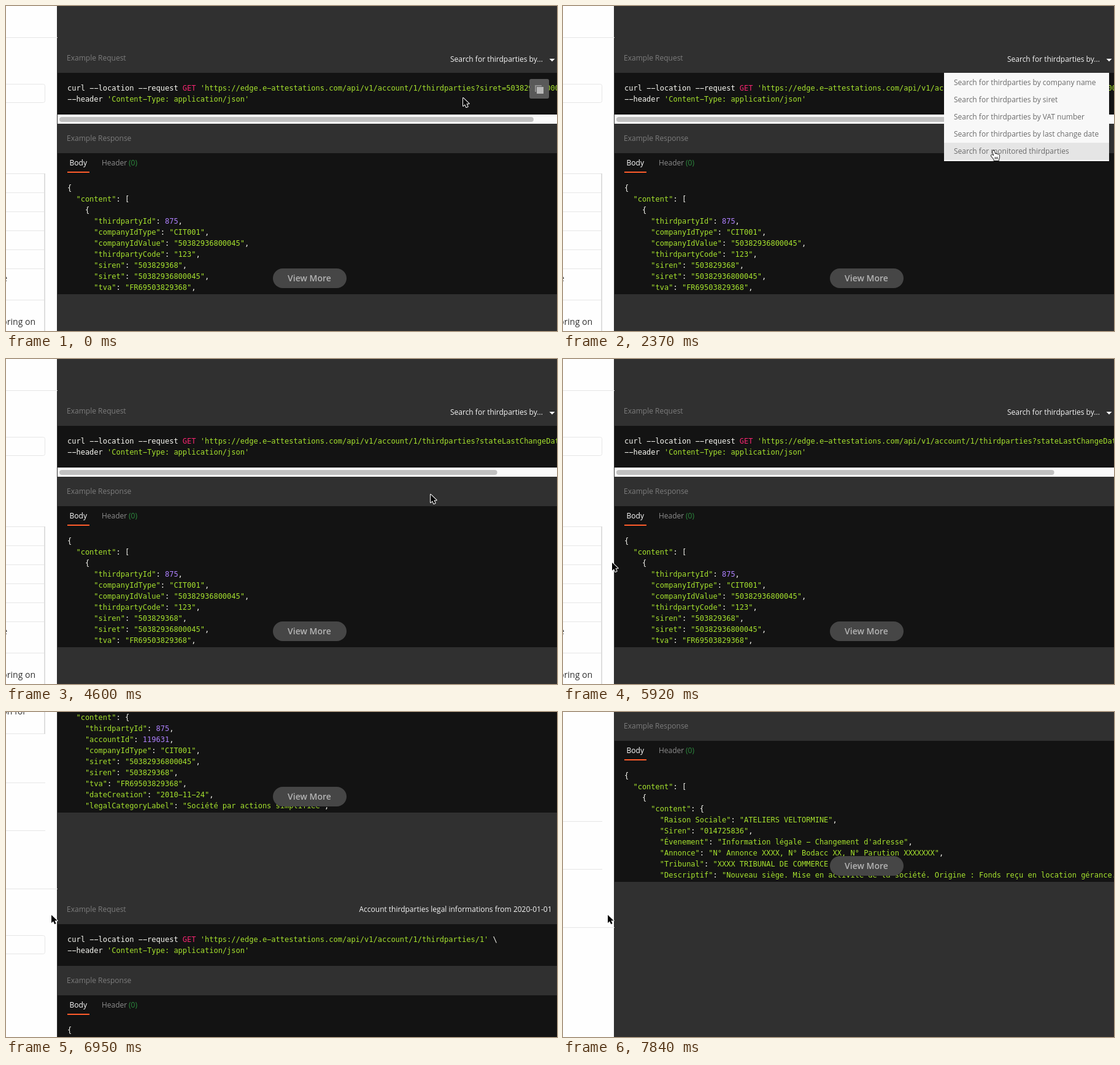
An HTML page with a canvas that plays this animation: 898 px wide and 530 px high, repeating every 7990 ms.

```html
<!DOCTYPE html>
<html lang="en">
<head>
<meta charset="utf-8">
<title>API documentation walkthrough</title>
<style>
  html, body { margin: 0; width: 100%; height: 100%; overflow: hidden; background: #303030; }
  canvas { display: block; }
</style>
</head>
<body>
<canvas id="stage" width="898" height="530"></canvas>
<script>
const ctx = document.getElementById('stage').getContext('2d');
const W = 898, H = 530;
const LOOP = 7990, TICK = LOOP / 54;
const UI = '"Open Sans", sans-serif';
const MONO = '12px "DejaVu Sans Mono", monospace';
const COLOR = {
  panel: '#303030', code: '#131313', line: '#e6e6e6', dim: '#7c7c7c', label: '#f4f4f4',
  plain: '#f8f8f2', string: '#a6e22e', number: '#ae81ff', verb: '#f92672'
};

const API = 'https://edge.e-attestations.com/api/v1/account/1/thirdparties';
const curl = path => [
  `curl --location --request GET '${API}${path}' \\`,
  "--header 'Content-Type: application/json'"
];
const SEARCHES = [
  { label: 'Search for thirdparties by...', path: '?siret=50382936800045' },
  { label: 'Search for monitored thir...', path: '?monitored=true' },
  { label: 'Search for thirdparties by...', path: '?stateLastChangeDate=2020-01-01' }
];
const MENU = ['thirdparties by company name', 'thirdparties by siret', 'thirdparties by VAT number',
  'thirdparties by last change date', 'monitored thirdparties'].map(s => 'Search for ' + s);

const SEARCH_JSON = `{
  "content": [
    {
      "thirdpartyId": 875,
      "companyIdType": "CIT001",
      "companyIdValue": "50382936800045",
      "thirdpartyCode": "123",
      "siren": "503829368",
      "siret": "50382936800045",
      "tva": "FR69503829368",`.split('\n');
const DETAIL_JSON = `{
  "content": {
    "thirdpartyId": 875,
    "accountId": 119631,
    "companyIdType": "CIT001",
    "siret": "50382936800045",
    "siren": "503829368",
    "tva": "FR69503829368",
    "dateCreation": "2010-11-24",
    "legalCategoryLabel": "Société par actions simplifiée",`.split('\n');
const LEGAL_JSON = `{
  "content": [
    {
      "content": {
        "Raison Sociale": "ATELIERS VELTORMINE",
        "Siren": "014725836",
        "Évenement": "Information légale - Changement d'adresse",
        "Annonce": "N° Annonce XXXX, N° Bodacc XX, N° Parution XXXXXXX",
        "Tribunal": "XXXX TRIBUNAL DE COMMERCE DE XXXX",
        "Descriptif": "Nouveau siège. Mise en activité de la société. Origine : Fonds reçu en location gérance.",`.split('\n');

const smooth = u => u * u * (3 - 2 * u);
const linear = u => u;
const easeIn = u => u ** 1.65;
const easeOut = u => 1 - (1 - u) ** 3;

// A track visits each point at its tick; the ease shapes the way there.
const key = (at, point, ease = smooth) => ({ at, point, ease });
const BUTTON = [798, 83], LAST_ITEM = [702, 235], DATE_ITEM = [728, 207], REST = [86, 435];
const POINTER = [
  key(0, [745, 149]), key(4, [208, 487]), key(7, [655, 404]),
  key(10, BUTTON), key(12, BUTTON), key(15, [706, 259]),
  key(16, LAST_ITEM), key(20, LAST_ITEM), key(25, [743, 81]),
  key(27, DATE_ITEM), key(30, DATE_ITEM), key(37, REST), key(38, REST),
  key(40, [80, 331]), key(44, [74, 330]), key(53, [73, 330])
];
const SCROLL = [key(40, [0]), key(44, [484], easeIn), key(47, [1094], linear), key(53, [1509], easeOut)];

function follow(track, tick) {
  const i = track.findIndex(k => k.at > tick);
  if (i === 0) return track[0].point;
  if (i < 0) return track.at(-1).point;
  const a = track[i - 1], b = track[i];
  const u = b.ease((tick - a.at) / (b.at - a.at));
  return a.point.map((v, n) => Math.round(v + (b.point[n] - v) * u));
}

function rect(x, y, w, h, color) {
  ctx.fillStyle = color;
  ctx.fillRect(x, y, w, h);
}
function pill(x, y, w, h, r, color) {
  ctx.beginPath();
  ctx.roundRect(x, y, w, h, r);
  ctx.fillStyle = color;
  ctx.fill();
}
function text(str, x, y, color, align = 'left', font = '12px ' + UI) {
  ctx.font = font;
  ctx.textAlign = align;
  ctx.fillStyle = color;
  ctx.fillText(str, x, y);
}

function charWidth() {
  ctx.font = MONO;
  return ctx.measureText('0').width;
}
function codeLine(line, x, y) {
  const step = charWidth();
  for (const m of line.matchAll(/"[^"]*"|'[^']*'|\bGET\b|\d+|[^"'\dG]+|./g)) {
    const s = m[0];
    const color = /^["']/.test(s) ? COLOR.string : s === 'GET' ? COLOR.verb
      : /^\d/.test(s) ? COLOR.number : COLOR.plain;
    // The wide dash matches the code typeface.
    text(s.replace(/-/g, '\u2212'), x + m.index * step, y, color, 'left', MONO);
  }
}
function codeBlock(lines, y) {
  lines.forEach((line, i) => codeLine(line, 100, y + i * 18));
}

function request(y, lines) {
  text('Example Request', 99, y - 20, COLOR.dim);
  rect(84, y, W, 68, COLOR.code);
  codeBlock(lines, y + 29);
}
function response(y, lines) {
  text('Example Response', 99, y - 20, COLOR.dim);
  rect(84, y, W, 230, COLOR.code);
  text('Body', 103.5, y + 20, '#fff');
  text('Header', 156, y + 20, '#8c8c8c');
  text('(0)', 200, y + 20, '#2d8a3e');
  rect(100, y + 30, 36, 2, '#ff5c2b');
  codeBlock(lines, y + 61);
  pill(435, y + 188, 120, 32, 16, '#464646');
  text('View More', 494.5, y + 209, '#b4b4b4', 'center', '600 14px ' + UI);
}

function scrollbar(y, line) {
  const view = 820, content = line.length * charWidth() + 32;
  rect(84, y, W, 15, '#fafafa');
  pill(87, y + 4, view * view / content, 8, 4, '#c1c1c1');
}
function caret(x, y) {
  ctx.beginPath();
  ctx.moveTo(x - 4.5, y);
  ctx.lineTo(x + 4.5, y);
  ctx.lineTo(x, y + 4.5);
  ctx.fillStyle = '#fff';
  ctx.fill();
}

function hline(y, w = 64) {
  rect(0, y, w, 1, COLOR.line);
}
function heading(y) {
  hline(y - 173);
  hline(y - 95);
  hline(y, 84);
}
function inputBox(y) {
  ctx.beginPath();
  ctx.roundRect(-10.5, y + .5, 74, 30, 3);
  ctx.strokeStyle = COLOR.line;
  ctx.lineWidth = 1;
  ctx.stroke();
}
function table(y, heights) {
  const top = y;
  hline(y);
  for (const h of heights) hline(y += h);
  rect(62, top, 2, y - top + 1, '#dedede');
}
function note(str, right, y) {
  text(str, right, y, '#303030', 'right', '14px ' + UI);
}

// Runs the drawing with y = 0 at the section's heading line.
function section(top, body) {
  ctx.save();
  ctx.translate(0, top);
  heading(0);
  if (body) {
    inputBox(76);
    body();
  }
  ctx.restore();
}

function searchSection({ label, path }) {
  const lines = curl(path);
  table(222, [31, 31, 31, 31, 31, 51, 72, 51]);
  note('the', 2, 398);
  note('monitoring on', 48, 469);
  text(label, 724, 40, COLOR.label);
  caret(890, 35);
  request(58, lines);
  scrollbar(126, lines[0]);
  response(189, SEARCH_JSON);
}
function accountSection(title, json) {
  text(title, 889.5, 38, COLOR.label, 'right');
  request(58, curl('/1'));
  response(174, json);
}
function detailSection() {
  table(224, [51]);
  note('information for', 33, 244);
  accountSection('Account thirdparties details', DETAIL_JSON);
}
function legalSection() {
  accountSection('Account thirdparties legal informations from 2020-01-01', LEGAL_JSON);
}

function copyButton() {
  pill(853, 119, 32, 32, 3, 'rgba(92,92,92,.97)');
  rect(862, 129, 11, 11, '#8e8e8e');
  rect(864, 131, 12, 12, '#5c5c5c');
  rect(865, 132, 11, 11, '#b8b8b8');
}
function menu(hover) {
  rect(621, 109, 269, 144, '#f8f8f8');
  MENU.forEach((s, i) => {
    if (i === hover) rect(621, 111 + i * 28, 269, 28, '#e5e5e5');
    text(s, 637, 129 + i * 28, '#6b6b6b');
  });
}

const ARROW = new Path2D('M0 1V14L3 11.2L5.2 16L7.6 15L5.4 10.3H9.6Z');
const HAND = new Path2D('M0 1C-2 1-2 3-1.3 4.5L.5 9.5L-2 8C-4 7.3-4.8 9-3.6 10.2L.5 15V17H8V14.8'
  + 'C9.4 13 9.5 11 9 8.5C8.7 6.8 7 6.8 6.6 7.5C6.2 6 4.6 6 4 6.7C3.8 5.6 2.6 5.4 2 6L1.2 2.5C1 1.4.7 1 0 1Z');
const FINGERS = new Path2D('M2.2 11V15M4.2 11V15M6.2 11V15');

function shape(path, x, y, fill, stroke, width) {
  ctx.save();
  ctx.translate(x, y);
  ctx.lineJoin = 'round';
  ctx.lineWidth = width;
  ctx.strokeStyle = stroke;
  ctx.fillStyle = fill;
  ctx.stroke(path);
  ctx.fill(path);
  ctx.restore();
}
function pointer(x, y, hand) {
  if (!hand) return shape(ARROW, x, y, '#000', '#fff', 2);
  shape(HAND, x, y, '#fff', '#111', 1.8);
  shape(FINGERS, x, y, '#fff', '#222', .9);
}

function draw(tick) {
  const [scroll] = follow(SCROLL, tick);
  const [x, y] = follow(POINTER, tick);
  const picked = tick < 18 ? 0 : tick < 30 ? 1 : 2;
  const open = (tick >= 11 && tick < 18) || (tick >= 25 && tick < 30);
  const inMenu = open && x > 621 && x < 890 && y >= 111 && y < 253;
  const onLabel = x > 716 && y > 76 && y < 98;
  const onCode = x > 84 && y > 109 && y < 177;

  rect(0, 0, W, H, COLOR.panel);
  rect(0, 0, 83, H, '#fefefe');
  ctx.save();
  ctx.translate(0, -scroll);
  section(51, () => searchSection(SEARCHES[picked]));
  section(854, detailSection);
  section(1382, legalSection);
  section(1860);
  if (open) menu(inMenu ? Math.floor((y - 111) / 28) : -1);
  else if (onCode) copyButton();
  ctx.restore();
  pointer(x, y, inMenu || onLabel);
}

// The picture advances in even, discrete steps; the small lead absorbs timer rounding.
function frame() {
  const time = performance.now() % LOOP;
  draw(Math.floor((time + 12) / TICK) % 54);
  requestAnimationFrame(frame);
}
frame();
</script>
</body>
</html>
```
